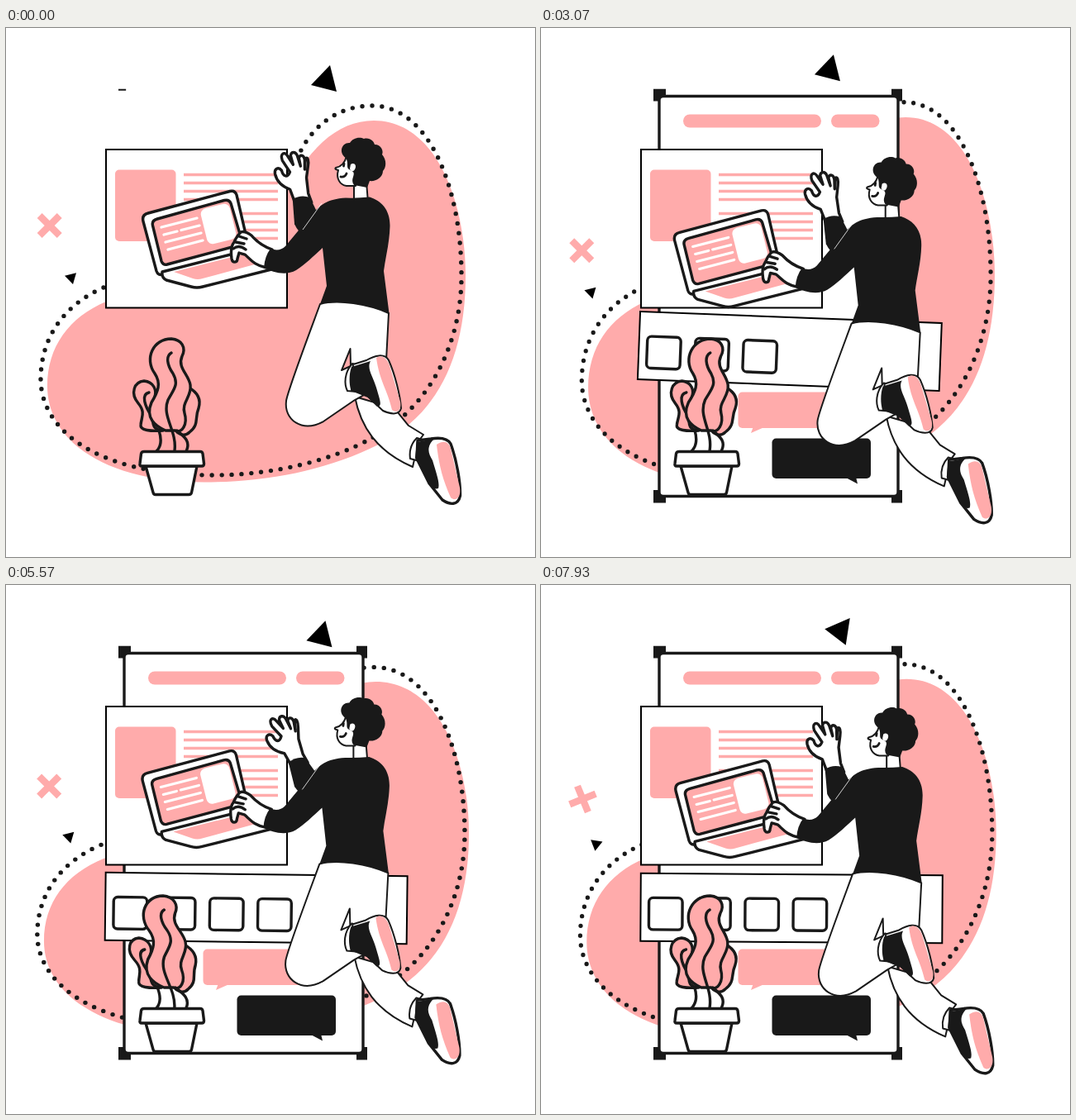
Write an HTML page that moves like this. It is 640 px wide and 640 px high and loops after 8000 ms.

```html
<!DOCTYPE html>
<html lang="en">
<head>
<meta charset="utf-8">
<title>Building a page</title>
<style>
  html, body { margin: 0; width: 100%; height: 100%; overflow: hidden; background: #fff; }
  svg { display: block; width: 100vw; height: 100vh; }
  .pink { fill: #ffabab; }
  .ink { fill: #191919; }
  .white { fill: #fff; }
  .line { stroke: #191919; stroke-width: 3.4; stroke-linecap: round; stroke-linejoin: round; }
  .thin { stroke: #191919; stroke-width: 2; stroke-linecap: round; stroke-linejoin: round; }
  .open { fill: none; }
</style>
</head>
<body>
<svg viewBox="0 0 640 640">
  <defs>
    <clipPath id="pageClip"><rect id="pageReveal" x="136" y="73.6"/></clipPath>
    <clipPath id="stripClip"><rect id="stripReveal" x="119" y="345" height="92"/></clipPath>
  </defs>

  <g id="blob">
    <path class="pink" d="M50 433C50 386 76 350 121 331C230 288 295 290 335 210C362 148 400 112 445 112C520 112 556 210 556 300C556 402 519 475 440 509C380 537 310 549.500 240 549.500C120 549 50 500 50 433Z"/>
    <path class="open" stroke="#191919" stroke-width="5.4" stroke-linecap="round" stroke-dasharray="0 11.9"
      d="M118 314C70 335 42 375 42 425C42 480 100 541 250 541C330 541 400 520 441 497C505 465 551 390 551 300C551 190 510 94 443 94C400 94 370 120 355 152"/>
  </g>

  <g id="cross" class="pink">
    <rect x="-17" y="-4.2" width="34" height="8.4" transform="rotate(45)"/>
    <rect x="-17" y="-4.2" width="34" height="8.4" transform="rotate(-45)"/>
  </g>
  <path id="smallTriangle" d="M-8-2L6-5.500L2 8.300Z"/>

  <g clip-path="url(#pageClip)">
    <path class="ink" d="M136 73.6h15v15h-15zM424 73.6h13v15h-13zM136 559h15v15.5h-15zM424 559h13v15.5h-13z"/>
    <rect class="white line" x="143" y="82.5" width="289" height="484" rx="5"/>
    <g class="pink">
      <rect x="172" y="104.5" width="167" height="16" rx="8"/>
      <rect x="351" y="104.5" width="58.500" height="16" rx="8"/>
      <rect x="238.500" y="440.500" width="120" height="43.500" rx="5"/>
      <path d="M257 482L254 490L270 483Z"/>
    </g>
    <rect class="ink" x="279.500" y="496.500" width="119.500" height="48.500" rx="5"/>
    <path class="ink" d="M367 543L383 551.500L381 543Z"/>
  </g>

  <path id="bigTriangle" d="M5-18.700L-18 5.300L13 13.300Z"/>

  <rect class="white" x="121" y="147" width="219" height="191.500" stroke="#000" stroke-width="2"/>
  <rect class="pink" x="132" y="171.500" width="73.500" height="86.500" rx="5"/>
  <path stroke="#ffabab" stroke-width="3.600" d="M215 177.500h114m-114 10h114m-114 10h114m-114 10h114m-114 17h114m-114 10h114m-114 10h114m-114 10h114"/>

  <g id="strip">
    <g clip-path="url(#stripClip)">
      <rect class="white" x="121" y="350" width="365" height="82" stroke="#000" stroke-width="2"/>
      <g id="tiles"></g>
    </g>
  </g>

  <g id="leaves" class="pink line">
    <path d="M190 487C175 488 162 487 163 480C164 470 169 465 160 454C150 442 155 428 167 427C178 428 184 438 179 449"/>
    <path class="open" d="M173 441C163 443 168 458 176 469C179 476 175 484 187 487"/>
    <path d="M221 435C232 441 236 450 233 460C228 472 234 480 222 489C215 496 207 490 205 486"/>
    <path d="M193 487C181 482 168 472 176 453C184 440 188 430 180 418C167 400 178 376 200 376C213 377 218 387 213 397C207 411 221 419 223 432C225 446 212 453 216 466C220 479 213 491 205 487Z"/>
    <path class="open" d="M204 511C207 487 188 470 196 450C202 438 210 432 202 418C195 408 193 397 200 393M182 512C189 505 188 496 185 487M218 512C224 500 215 494 207 487"/>
  </g>
  <g class="white line">
    <path d="M169 530L178 562Q178.500 564.500 181 564.500H221Q224 564.500 224.500 562L231 530Z"/>
    <path d="M167 512.500H235Q237.500 512.500 238 515L239.500 527Q239.500 530 237 530H164Q161.500 530 162 527L163.500 515Q164 512.500 167 512.500Z"/>
  </g>

  <g id="person">
    <g class="white line">
      <path d="M172 224L271 197.500Q277 196 279 202L292 258Q294 266 288 270L190 298Q184 300 182 294L166 234Q164 226 172 224Z"/>
      <path class="pink" d="M183 231L264 208.500Q270 207 272 212L285 256Q286 261 281 263L195 286Q190 287 188 282L177.500 239Q176 233 183 231Z"/>
      <path d="M189 295L292 269L345 286L238 313Q231 315 224 313L194 305Q188 302 189 295Z"/>
    </g>
    <path class="pink" d="M203 295L290 273L312 283L238 303Q232 305 226 303Z"/>
    <rect class="white" x="-18" y="-22" width="36" height="44" rx="7" transform="translate(257 237) rotate(-14)"/>
    <path stroke="#fff" stroke-width="3.200" stroke-linecap="round" d="M188 241L231 230M191 250L207 246M212 244.500L234 239M193 259L236 248M196 268L238 257"/>

    <g class="white thin">
      <path d="M422 446C429 482 448 512 492 531L499 500L505 492L487 481L470 460Z"/>
      <path fill-rule="evenodd" d="M380 334C402 328 438 334 463 345L460 402L440 440L422 450L384 476C358 490 336 474 339 451C341 438 369 364 380 334ZM416.500 388L406 414L417 409Z"/>
      <path d="M419 406C409 417 409 431 413 439L424 440L426 408Z"/>
      <path d="M497 496C489 504 488 514 489 521L500 524L504 498Z"/>
      <path d="M420 407L436 402C446 396 458 393 463 402C471 420 477 445 478 460C476 469 464 467 456 463L438 446L418 438Z"/>
      <path class="line" d="M498 499L514 497C526 495 534 496 538 503C545 522 550 550 549.500 566C547 578 537 577 528 571L512 551L497 521Z"/>
    </g>
    <path class="ink" d="M418 410L441 403C436 412 444 421 448 435C452 449 456 458 449 458L437 446L417 437C415 430 415 418 418 410ZM497 501L518 497C508 507 511 515 516 523C521 540 525 550 523 557C517 559 512 554 510 548C506 535 498 525 495 520Z"/>
    <path class="pink" d="M448 399C455 394 461 400 464 408L477 452C479 464 472 466 467 462C461 436 452 428 448 399ZM521 504C530 498 536 501 538 509L549 556C551 569 543 573 538 568C528 545 524 530 521 504Z"/>

    <g id="raisedArm">
      <path class="white line" d="M349 209L344 195C336 192 328 186 326 176C325 170 330 167 334 172C336 180 341 181 344 174L335 160C332 151 338 149 341 154L348 165L345 154C346 149 351 149 353 154L357 167L355 157C357 152 361 154 362 159L362 171L363 158C366 155 367 161 366 167L364 181L366 200L370 211"/>
      <path class="ink" d="M347 207Q357 201 368 205L377 224L360 249Q354 248 349 237Z"/>
    </g>

    <g id="typingHand" class="white line">
      <path d="M322 268C310 264 303 258 297 251Q289 245 284 247Q279 252 276 259C272 264 272 272 273 279C274 285 280 284 280 279L282 272L289 274C296 280 300 287 315 290"/>
      <path class="open" d="M282 252L291 255M278 259L288 261M275 267C280 263 285 264 290 268"/>
    </g>

    <path class="white thin" d="M421 186L421 211L438 211L436 186Z"/>
    <path class="ink" d="M411 205.500Q425 206 440 204.500C454 209 465 220 464.500 240C464 260 459 278 457 294L463.500 345C438 334 402 328 380 334L388 312L383 266C372 276 362 286 351 293C339 300 323 296 312 290Q313 276 320 267Q331 271 338 264L368 228C380 214 388 207 411 205.500Z"/>
    <path class="open" stroke="#fff" stroke-width=".8" d="M382 212L359 244"/>

    <path class="white thin" d="M412 155C410 163 405 168 399 169Q397 171 402 172C399 182 404 190 412 191L423 191L430 160Z"/>
    <path class="ink" d="M411 157C402 151 406 138 416 139C419 133 428 131 433 134C440 132 445 137 446 141C454 141 457 149 455 153C461 160 460 169 456 173C456 181 447 186 440 185L437 193L421 190C416 183 423 178 420 174L415 171C411 169 415 163 411 157Z"/>
    <path class="white" d="M417 165C421 162 425 166 422 171C420 175 416 173 416 170Z"/>
    <path class="open" stroke="#191919" stroke-width="2.800" stroke-linecap="round" d="M409 164L408.500 167M405 180Q410 181 412 176"/>
  </g>
</svg>

<script>
const LOOP = 8000;
const part = id => document.getElementById(id);
const place = (id, transform) => part(id).setAttribute("transform", transform);
const clamp01 = v => Math.min(1, Math.max(0, v));
const triangleWave = (t, period) => 1 - Math.abs((t % period) * 2 / period - 1);

// Linear interpolation through [time, value] keys.
function track(t, keys) {
  const i = keys.findIndex(([time]) => time > t);
  if (i < 0) return keys[keys.length - 1][1];
  const [t0, v0] = keys[i - 1], [t1, v1] = keys[i];
  return v0 + (v1 - v0) * (t - t0) / (t1 - t0);
}

const ARM_CYCLE = [[0, .5], [1300, 10.5], [3100, 2], [4200, .5]];
const LEAF_SWAY = [[0, 0], [1290, 6.5], [2200, 7], [3070, 5.5], [4210, -10], [4900, -11], [5570, -10], [7070, 1.5], [8000, 5]];
const BLOB_X = [[0, 1], [600, 1.018], [900, 1.014], [1290, .986], [2000, .943], [3070, .972], [4210, .994], [5570, 1.016], [6070, 1.013], [7070, .943], [8000, .982]];
const BLOB_Y = [[0, 1], [600, .98], [1290, 1.005], [2000, 1.022], [3070, 1.018], [4210, 1], [5570, .977], [7070, 1.022], [8000, .99]];
const STRIP_TILT = [[0, 0], [1800, 0], [3070, 2.2], [4210, 3.4], [5570, .7], [7070, 0], [8000, .4]];

const tiles = [0, 1, 2, 3].map(i => {
  const tile = document.createElementNS("http://www.w3.org/2000/svg", "rect");
  const attributes = { class: "white line", x: 131 + i * 58.2, y: 379.5, width: 40.5, height: 38.5, rx: 5 };
  for (const name in attributes) tile.setAttribute(name, attributes[name]);
  part("tiles").append(tile);
  return tile;
});

function draw(t) {
  const drift = triangleWave(t, 6000);
  const spin = Math.max(0, t - 6000) * .0118;

  place("person", `translate(${-4.4 * drift} ${24 * drift})`);
  place("raisedArm", `rotate(${-track(t % 4200, ARM_CYCLE)} 370 235)`);
  place("typingHand", `rotate(${-6 * triangleWave(t, 2700)} 316 278)`);

  place("bigTriangle", `translate(${387 - 39 * drift} ${63.7 - 13 * drift}) rotate(${spin})`);
  place("smallTriangle", `translate(${79 - 19 * drift} ${301.7 + 18 * drift}) rotate(${spin})`);
  place("cross", `translate(${52.7 - 3.5 * drift} ${239 + 31 * drift}) rotate(${spin})`);

  place("blob", `translate(303 330) scale(${track(t, BLOB_X)} ${track(t, BLOB_Y)}) translate(-303 -330)`);
  const lean = track(t, LEAF_SWAY) / 138;
  place("leaves", `matrix(1 0 ${-lean} 1 ${513 * lean} 0)`);

  part("pageReveal").setAttribute("width", Math.min(302, 9 + t * .1558));
  part("pageReveal").setAttribute("height", Math.min(502, 2 + t * .2685));

  part("stripReveal").setAttribute("width", 369 * clamp01((t - 1350) / 550));
  place("strip", `translate(${-1.2 * track(t, STRIP_TILT)} 0) rotate(${track(t, STRIP_TILT)} 303 391)`);
  tiles.forEach((tile, i) => tile.setAttribute("opacity", clamp01((t - 1700 - i * 600) / 150)));
}

function frame() {
  draw(performance.now() % LOOP);
  requestAnimationFrame(frame);
}
frame();
</script>
</body>
</html>
```
